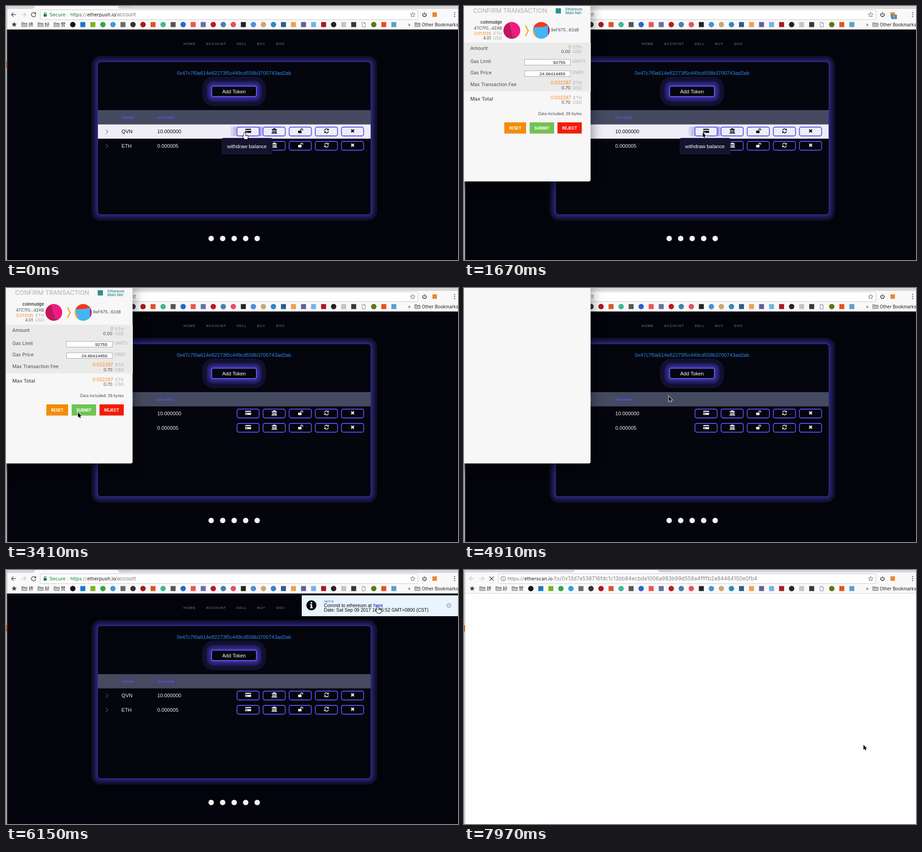
Recreate the animation shown at these times as an HTML page with a canvas. Size 998 px wide and 561 px high, loop 8 s.

```html
<!DOCTYPE html>
<html lang="en">
<head>
<meta charset="utf-8">
<title>Token withdrawal</title>
<style>
html, body { margin: 0; width: 100%; height: 100%; overflow: hidden; background: #03040b; }
canvas { display: block; width: 998px; height: 561px; }
</style>
</head>
<body>
<canvas id="stage"></canvas>
<script>
const W = 998, H = 561, LOOP = 8000;
const canvas = document.getElementById('stage');
const dpr = window.devicePixelRatio || 1;
canvas.width = W * dpr;
canvas.height = H * dpr;
const ctx = canvas.getContext('2d');
const UI = 'Inter, sans-serif';
const SITE = '"Liberation Sans", Arial, sans-serif';
const CJK = '"Noto Sans CJK SC", "Noto Sans CJK", sans-serif';
const VIOLET = '#5f4ff5', DARK = '#04050d', ORANGE = '#f7861c';

// Pointer positions: time, x, y. The picture only changes at these times.
const POINTER = [
  [0, 527, 280], [1070, 527, 279], [1220, 527, 279], [1370, 527, 279],
  [1670, 527, 279], [1820, 462, 303], [1970, 345, 330], [2120, 215, 333],
  [2370, 166, 305], [2520, 164, 287], [2670, 165, 270], [2970, 165, 270],
  [3410, 159, 275], [4160, 159, 275], [4310, 159, 275], [4610, 166, 300],
  [4760, 300, 268], [4910, 452, 239], [5050, 525, 215], [5260, 572, 195],
  [5410, 595, 184], [5560, 606, 177], [5710, 713, 116], [5860, 788, 91],
  [6000, 818, 82], [6150, 821, 81], [6450, 821, 80], [6600, 821, 80],
  [7110, 803, 150], [7260, 748, 300], [7410, 688, 415], [7560, 664, 454],
  [7700, 722, 446], [7820, 818, 412], [7970, 882, 386]
];

const FAVICONS = ('c#151515 s#1a78c8 s#78b41c c#35a64e c#3c9cdc s#6a6a6a c#333 c#a81a1a ' +
  's#d9542b c#3dbb8f s#555 c#2d62d4 s#f0524f s#6470a8 c#c01818 c#4580b0 c#e8505b s#222 ' +
  'c#4a90d9 c#c9a873 c#3286c4 s#2f5a8c s#f0a050 s#60609c s#70b4e4 s#a81822 c#2a2418 ' +
  's#c4c4c4 s#383838 - c#5a7a10 s#e8501e s#5aa0cc').split(' ');

function text(s, x, y, font, color, align = 'left', spacing = 0) {
  ctx.font = font;
  ctx.fillStyle = color;
  ctx.textAlign = align;
  ctx.letterSpacing = spacing + 'px';
  ctx.fillText(s, x, y);
}

function box(x, y, w, h, color) {
  ctx.fillStyle = color;
  ctx.fillRect(x, y, w, h);
}

function round(x, y, w, h, r, fill, stroke, lw = 1) {
  ctx.beginPath();
  ctx.roundRect(x, y, w, h, r);
  if (fill) { ctx.fillStyle = fill; ctx.fill(); }
  if (stroke) { ctx.strokeStyle = stroke; ctx.lineWidth = lw; ctx.stroke(); }
}

function disc(x, y, r, color) {
  ctx.beginPath();
  ctx.arc(x, y, r, 0, 7);
  ctx.fillStyle = color;
  ctx.fill();
}

function stroke(d, color, lw) {
  ctx.strokeStyle = color;
  ctx.lineWidth = lw;
  ctx.stroke(new Path2D(d));
}

function fill(d, color) {
  ctx.fillStyle = color;
  ctx.fill(new Path2D(d));
}

function at(x, y, draw, scale = 1) {
  ctx.save();
  ctx.translate(x, y);
  ctx.scale(scale, scale);
  draw();
  ctx.restore();
}

function folder(x) {
  at(x, 41, () => {
    fill('M-6 -4.5H-1.5L-.5 -3H6V4.5H-6Z', '#c4c4c4');
    stroke('M-6 -4.5H-1.5L-.5 -3H6V4.5H-6ZM-6 -1.5H6', '#777', 0.9);
  });
}

function star(x, y, r, color, filled) {
  ctx.beginPath();
  for (let i = 0; i < 10; i++) {
    const a = i * Math.PI / 5 - Math.PI / 2, q = i % 2 ? r * 0.45 : r;
    ctx.lineTo(x + q * Math.cos(a), y + q * Math.sin(a));
  }
  ctx.closePath();
  if (filled) { ctx.fillStyle = color; ctx.fill(); }
  else { ctx.strokeStyle = color; ctx.lineWidth = 1; ctx.stroke(); }
}

function tabs(t, loading) {
  const opening = loading && t < 6600;
  const h = loading && !opening ? 4 : 5;
  box(0, 0, W, h, '#d8d8d8');
  box(0, h, W, 1, '#c6c6c6');
  const [l, r] = !loading ? [62, 249] : opening ? [247, 427] : [242, 430];
  if (loading) {
    box(64, 0, l - 66, h, '#dcdcdc');
    stroke(`M60 ${h}L64 0`, '#b8b8b8', 1);
  }
  fill(`M${l - 2} ${h + 1}L${l + 2} 0H${r - 2}L${r + 2} ${h + 1}Z`, '#f9f9f9');
  stroke(`M${l - 2} ${h}L${l + 2} 0M${r - 2} 0L${r + 2} ${h}`, '#b5b5b5', 1);
  round(r + 4, -4, 23, 5.5, 2, '#e0e0e0', '#b5b5b5');
  if (opening) {
    text('Untitled', 270, 5.8, '9.4px ' + UI, '#222');
    stroke('M262 6Q266 4 264 0', '#74a8ec', 1.2);
    stroke('M412.5 0.5L417.5 5.5M417.5 0.5L412.5 5.5', '#555', 1.1);
  }
}

function toolbar(t, loading) {
  box(0, 0, W, 52, '#f9f9f9');
  tabs(t, loading);
  stroke('M22 19H12.5M16.5 14.5L12 19L16.5 23.5', loading ? '#c9c9c9' : '#555', 1.5);
  stroke('M34 19H43.5M39.5 14.5L44 19L39.5 23.5', '#cccccc', 1.5);
  if (loading) stroke('M56.5 14.5L65.5 23.5M65.5 14.5L56.5 23.5', '#555', 1.6);
  else {
    stroke('M65 16.5A4.8 4.8 0 1 0 65.7 20', '#555', 1.5);
    fill('M66.3 13V18H61.3Z', '#555');
  }
  round(75.5, 8.5, 834, 21.5, 3, '#fff', '#c6c6c6');

  const font = '10.7px ' + UI;
  if (loading) {
    stroke('M91.5 19A5 5 0 1 1 81.5 19A5 5 0 1 1 91.5 19M86.5 18V22M86.5 15.8V17', '#666', 1.1);
    text('https://', 96, 23, font, '#7b7b7b');
    text('etherscan.io', 133, 23, font, '#222');
    text('/tx/0x13d7a538716fdc1c13bb84ecbda1006a983b99d558a4ffffb2a94464150e0fb4',
      197, 23, '11.2px ' + UI, '#7b7b7b', 'left', 0.25);
  } else {
    round(83, 18, 7, 5.5, 0.8, '#17803d');
    stroke('M84.4 18V16.5A2.1 2.1 0 0 1 88.6 16.5V18', '#17803d', 1.2);
    text('Secure', 96, 23, font, '#17803d');
    box(136, 12, 1, 14, '#d9d9d9');
    text('https', 142, 23, font, '#17803d');
    text('://', 167, 23, font, '#7b7b7b');
    text('etherpush.io', 179, 23, font, '#222');
    text('/account', 241, 23, '11px ' + UI, '#7b7b7b');
  }
  star(898, 19.5, 5.5, '#666');

  stroke('M921.6 16.2A4 4 0 1 0 926.4 16.2M924 14V19', '#333', 1.5);
  box(941.5, 14, 10, 10, '#e8892c');
  if (t >= 1070 && t < 3410) {
    round(943, 19, 13, 10, 1.5, '#5f88a8');
    text('1', 949.5, 27, '8px ' + UI, '#fff', 'center');
  }
  for (const y of [14.5, 19, 23.5]) disc(990.5, y, 1.2, '#555');

  star(18, 41, 6, '#444', true);
  ['挤', '好', '赞'].forEach((s, i) => {
    folder(40.5 + 35.7 * i);
    text(s, 50 + 35.5 * i, 45, '10.5px ' + CJK, '#222');
  });
  FAVICONS.forEach((f, i) => {
    const x = 147.5 + 22.15 * i;
    if (f[0] === 'c') disc(x, 41, 6, f.slice(1));
    else if (f[0] === 's') box(x - 5.5, 35.5, 11, 11, f.slice(1));
    else at(x, 41, () => stroke('M-3.5 -5H1L3.5 -2.5V5H-3.5ZM1 -5V-2.5H3.5', '#777', 0.9));
  });
  text('»', 887.5, 44.5, '10px ' + UI, '#444');
  folder(908.5);
  text('Other Bookmarks', 918, 44.5, '9.8px ' + UI, '#222');
  box(0, 51, W, 1, '#d6d6d6');
}

// Stepped glow: each band is [spread, colour], widest first.
function glow(x, y, w, h, r, bands) {
  for (const [s, c] of bands) round(x - s, y - s, w + 2 * s, h + 2 * s, r + s, c);
}

const ICONS = [
  (c, bg) => {
    round(-6.5, -4.5, 13, 9, 1.2, c);
    box(-6.5, -2.2, 13, 2.2, bg);
    box(-5, 2, 3.5, 1, bg);
  },
  c => {
    fill('M0 -6L6 -3V-2H-6V-3Z', c);
    for (const x of [-4.5, -1.7, 1.1, 3.3]) box(x, -1.3, 1.6, 4, c);
    box(-5.2, 2.9, 10.4, 1, c);
    box(-6.2, 4.3, 12.4, 1.5, c);
  },
  c => {
    round(-5, -0.5, 7.5, 5.5, 0.8, c);
    stroke('M1 -.5V-2.4A2.1 2.1 0 0 1 5.2 -2.4V-.8', c, 1.4);
  },
  c => {
    stroke('M-4.4 -1A4.4 4.4 0 0 1 3.2 -3M4.4 1A4.4 4.4 0 0 1 -3.2 3', c, 1.6);
    fill('M5 -5.2V-1H.8ZM-5 5.2V1H-.8Z', c);
  },
  c => stroke('M-3 -3L3 3M3 -3L-3 3', c, 2.6)
];

function row(y, name, amount, hover) {
  const bg = hover ? '#efedf8' : DARK, ink = hover ? '#0b0b14' : '#f2f2f8';
  if (hover) {
    box(203, y, 602, 31.5, bg);
    round(496, y + 5, 20, 21, 4, '#d8d5f1');
    round(502, y + 5, 14, 21, 3, '#c2bdec');
    box(558, y + 5, 9, 21, '#c2bdec');
    box(558, y + 5, 5, 21, '#a49cf0');
  }
  at(222.5, y + 16, () => stroke('M-2.2 -4.7L2.5 0L-2.2 4.7', hover ? '#333' : '#8a8a94', 1));
  text(name, 255, y + 19.7, '11.2px ' + SITE, ink);
  text(amount, 334, y + 19.7, '11.2px ' + SITE, ink);
  ICONS.forEach((icon, i) => {
    const x = 510 + 57.65 * i;
    round(x, y + 6, 49, 19.5, 4, bg, VIOLET, 1.8);
    at(x + 24.7, y + 14.3, () => icon(ink, bg));
  });
}

function site(t) {
  const hover = t < 1820;
  box(0, 52, W, H - 52, '#03040b');
  const nav = '7.5px ' + SITE;
  [['HOME', 392], ['ACCOUNT', 442], ['SELL', 509], ['BUY', 554.5], ['DOC', 596.5]]
    .forEach(([s, x]) => text(s, x, 85.7, nav, '#85858a', 'left', 1.05));

  glow(203, 124, 602, 336, 6, [[14, '#11102f'], [9, '#1a184c'], [5, '#242069'], [2, '#2d287f'], [0, DARK]]);
  text('0x47c7f0a614e82273f5c449cd558b3700743ad2ab', 503.5, 152, '11.2px ' + SITE, '#2d8cf0', 'center');
  glow(453, 176, 101, 25, 5, [[20, '#121030'], [11, '#1c1a50'], [8, '#26226c'], [4, '#322d8c']]);
  round(454, 177, 99, 23, 4, DARK, '#6957ff', 2);
  text('Add Token', 503.5, 192.5, '11px ' + SITE, '#fff', 'center');

  box(203, 230, 602, 31.5, '#454a60');
  const head = 'bold 7.9px ' + SITE;
  text('TOKEN', 255, 248.7, head, '#5b50ff');
  text('BALANCE', 334, 248.7, head, '#5b50ff');
  row(261.5, 'QVN', '10.000000', hover);
  row(293, 'ETH', '0.000005', false);
  if (hover) {
    round(476, 291.5, 112.5, 36.5, 4, '#15132e');
    text('withdraw balance', 532, 314, '11.3px ' + SITE, '#fff', 'center');
  }
  for (let i = 0; i < 5; i++) disc(453 + 25.4 * i, 513.5, 6, '#f4f4f4');
}

function notice(t) {
  if (t < 5260) return;
  const p = Math.min(1, (t - 5110) / 450);
  at(346 * (1 - p) ** 2, 0, () => {
    box(653, 56, 345, 46, '#e9f4fe');
    disc(674.3, 78, 11, '#060606');
    disc(674.3, 72.3, 1.9, '#e9f4fe');
    fill('M671.3 75.5H676V82.5H677.5V84.5H671.3V82.5H672.7V77.5H671.3Z', '#e9f4fe');
    text('INFO', 702, 72, 'bold 7.5px ' + SITE, '#2d8cf0', 'left', 1.2);
    text('Commit to ethereum at', 702, 82, '10.4px ' + SITE, '#0a0a0a');
    text('here', 811.5, 82, '10.4px ' + SITE, '#0000ee');
    text('Date: Sat Sep 09 2017 16:05:52 GMT+0800 (CST)', 702, 92, '10.25px ' + SITE, '#0a0a0a');
    disc(978, 78.3, 5.5, '#b9c0c8');
    at(978, 78.3, () => stroke('M-2 -2L2 2M2 -2L-2 2', '#f4f9ff', 1.4));
  });
}

// Disc with coloured segments cut off by straight chords.
function pie(x, y, base, cuts) {
  const r = 18.5;
  disc(x, y, r, base);
  for (const [a, b, color] of cuts) {
    ctx.beginPath();
    ctx.arc(x, y, r, a, b);
    ctx.fillStyle = color;
    ctx.fill();
  }
}

function money(value, unit, y, size, right, unitRight, color) {
  text(value, right, y, size + 'px ' + UI, color, 'right');
  text(unit, unitRight, y, '9.4px ' + UI, '#adadad', 'right');
}

function button(s, x, w, color, scale = 1) {
  at(x + w / 2, 269.5, () => {
    box(-w / 2, -11.5, w, 24.5, '#dddddd');
    box(-w / 2, -12.5, w, 24.5, color);
    text(s, 0, 3, 'bold 8.5px ' + UI, '#fff', 'center');
  }, scale);
}

function transaction(t) {
  const f = s => s + 'px ' + UI;
  text('CONFIRM TRANSACTION', 20, 15.3, f(13.5), '#adadad');
  box(202.5, 5, 11.5, 11.5, '#2f8f96');
  text('Ethereum', 224, 10, '500 8.2px ' + UI, '#2a8592');
  text('Main Net', 224, 18, '500 8.2px ' + UI, '#2a8592');

  text('coinnudge', 84, 39, '600 9.3px ' + UI, '#3c3c3c', 'right');
  text('47C7f0...d2AB', 84, 52, f(9), '#4a4a4a', 'right');
  money('0.013135', 'ETH', 63.5, 9, 60, 84, ORANGE);
  money('4.01', 'USD', 74, 9, 59.5, 84, '#4a4a4a');
  pie(105.5, 54, '#c3145c', [[-1.95, 1.15, '#f5197f'], [-1.98, -1.72, '#3fa8ee'], [1.0, 1.22, '#8a3fa8']]);
  fill('M100 37L108 69L111 71L101.5 36.5Z', '#a8408c');
  pie(170.5, 54, '#45b4f4', [[-2.75, -0.45, '#fb3612'], [-0.62, 0.62, '#b3175e'], [2.15, 3.45, '#f2a51e']]);
  fill('M153.5 50L186 43.5L182 68L172 72.5L160 69Z', '#45b4f4');
  stroke('M135.8 43L141.8 54.5L135.8 66', '#f7a120', 2.6);
  text('9eF675...62d8', 192, 56, f(9), '#4a4a4a');

  box(0, 81, 280, 107.5, '#eaeaea');
  [['Amount', 97], ['Gas Limit', 126], ['Gas Price', 151], ['Max Transaction Fee', 177]]
    .forEach(([s, y]) => text(s, 14, y, f(10.4), '#4a4a4a'));
  text('Max Total', 14, 209, '500 10.8px ' + UI, '#4a4a4a');
  money('0', 'ETH', 93.5, 10, 237, 260, ORANGE);
  money('0.00', 'USD', 104, 9.6, 235, 260, '#4a4a4a');
  [[173, 183.5], [205.5, 216]].forEach(([a, b]) => {
    money('0.002287', 'ETH', a, 10, 236.5, 260, ORANGE);
    money('0.70', 'USD', b, 9.6, 235, 260, '#4a4a4a');
  });
  [['92755', 117.5, 'UNITS'], ['24.66414455', 142.5, 'GWEI']].forEach(([v, y, unit]) => {
    box(133, y, 102.5, 13.5, '#a6a6a6');
    box(134, y + 1, 100.5, 11.5, '#fff');
    text(v, 224, y + 10.3, '9.8px ' + SITE, '#111', 'right');
    text(unit, 239, y + 7.8, f(9.5), '#adadad');
  });
  text('Data included: 36 bytes', 260, 241, f(8.6), '#4a4a4a', 'right');
  button('RESET', 89, 48, '#f38c05');
  button('SUBMIT', 145, 54, '#70c354', t >= 2670 && t < 2970 ? 1.1 : 1);
  button('REJECT', 206.5, 53.5, '#f11d08');
}

function popup(t) {
  if (t < 1220 || t >= 5050) return;
  ctx.save();
  ctx.beginPath();
  ctx.rect(0, 0, W, H);
  ctx.roundRect(-10, -10, 289.5, 397.5, 4);
  ctx.clip('evenodd');
  ctx.shadowColor = 'rgba(0,0,0,.5)';
  ctx.shadowBlur = 28 * dpr;
  ctx.shadowOffsetY = 8 * dpr;
  round(-10, -10, 289.5, 397.5, 4, '#000');
  ctx.restore();
  if (t < 1370) return;
  round(-10, -10, 289.5, 397.5, 4, '#f7f7f7');
  if (t >= 1670 && t < 4160) transaction(t);
}

function pointer(t, x, y) {
  const hand = t < 1070 || t === 6150;
  const d = hand
    ? 'M-1.6 1Q0 -1.2 1.6 1V5.2L6 6.2Q8 7 7.4 9.5L6 14H-.2L-4 9Q-4.8 6.8 -2.9 7L-1.6 8.2Z'
    : 'M0 0V11L2.4 8.7L4.1 12.5L6 11.7L4.4 7.9H7.8Z';
  at(x, y, () => {
    stroke(d, hand ? '#111' : '#fff', hand ? 1.8 : 1.6);
    fill(d, hand ? '#fff' : '#000');
    if (hand) stroke('M1.6 5V8M3.6 5.6V8M5.5 6V8.2', '#111', 0.7);
  });
}

function draw(time) {
  const [t, x, y] = POINTER.findLast(p => p[0] <= time);
  const loading = t >= 6450;
  ctx.setTransform(dpr, 0, 0, dpr, 0, 0);
  toolbar(t, loading);
  if (loading) box(0, 52, W, H - 52, '#fefefe');
  else {
    site(t);
    notice(t);
  }
  box(0, 0, 1.5, H, '#d6d6d6');
  box(1.5, 0, 1, H, '#a4a4a4');
  box(0, 122, 2, 14, '#d2560c');
  popup(t);
  pointer(t, x, y);
}

const start = performance.now();
function tick() {
  draw((performance.now() - start) % LOOP);
  requestAnimationFrame(tick);
}
tick();
</script>
</body>
</html>
```
